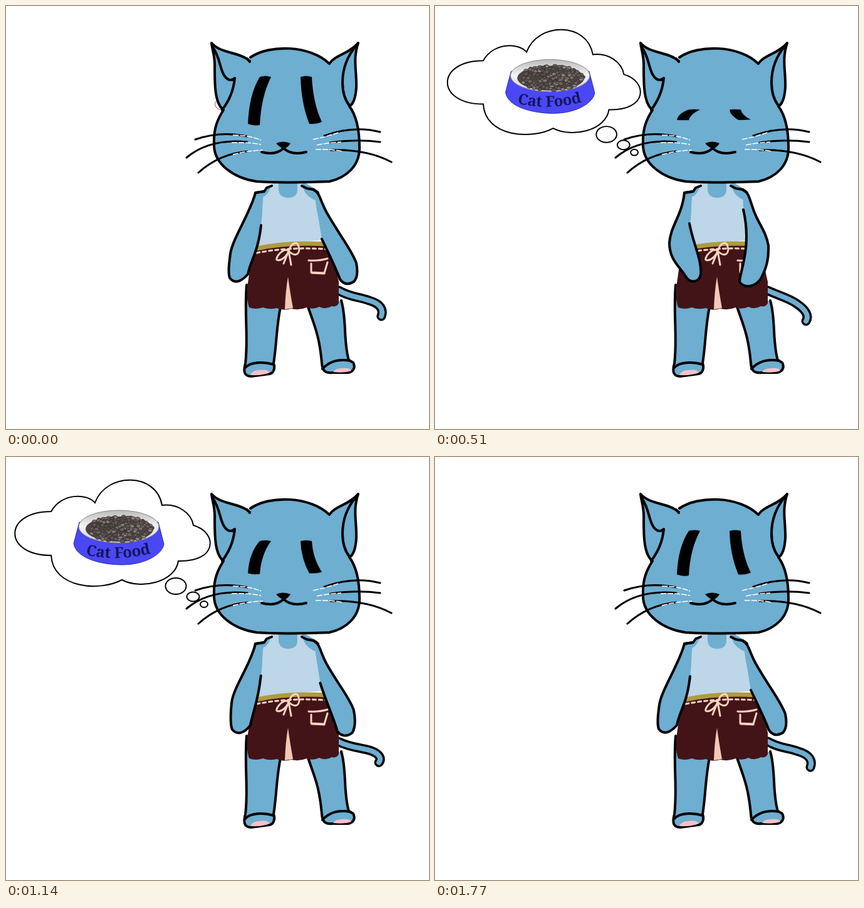
Write an HTML page that moves like this. It is 675 px wide and 675 px high and loops after 1800 ms.

```html
<!DOCTYPE html>
<html lang="en">
<head>
<meta charset="utf-8">
<title>Hungry cat</title>
<style>
  html, body { margin: 0; width: 100%; height: 100%; overflow: hidden; background: #fff; }
  svg { display: block; width: 100vw; height: 100vh; }

  .fur { fill: #6eaed1; }
  .line { stroke: #000; stroke-width: 4; stroke-linecap: round; stroke-linejoin: round; }
  .none { fill: none; }
  .thread { fill: none; stroke: #f8d3c0; stroke-width: 3; stroke-linecap: round; stroke-linejoin: round; }
  .thought { fill: #fff; stroke: #000; stroke-width: 2; }
  .label { font: bold 24px "Noto Serif", "Liberation Serif", serif; fill: #15155c; }

  .cloud, .eyes, .arm, .tail { animation: 1800ms linear infinite; }
  .cloud { animation-name: think; }
  .eyes { animation-name: blink; transform-origin: 0 180px; }
  .arm.left { animation-name: left-arm; }
  .arm.right { animation-name: right-arm; }
  .tail { animation-name: wag; fill: none; stroke-linecap: round; }

  @keyframes think {
    0% { transform: translate(330px, 120px) scale(.3); }
    13.33% { transform: translate(162px, 51px) scale(.725); }
    28.33% { transform: translate(6px, 1.4px) scale(.988); }
    30%, 68% { transform: translate(0, 0) scale(1); }
    71.67% { transform: translate(42px, 25px) scale(.86); }
    85% { transform: translate(245px, 116px) scale(.369); }
    90% { transform: translate(315px, 139px) scale(.18); }
    92%, 100% { transform: translate(350px, 155px) scale(.06); }
  }
  @keyframes blink {
    0% { transform: scaleY(1); }
    13.33% { transform: scaleY(.564); }
    28.33%, 29.5% { transform: scaleY(.22); }
    51.67% { transform: scaleY(.55); }
    71.67% { transform: scaleY(.78); }
    85%, 100% { transform: scaleY(.925); }
  }
  @keyframes left-arm {
    0%, 67.5%, 100% { d: path("M411 296 L398 298 C390 330 362 370 358 395 C356 410 354 425 357 434 C365 444 375 440 386 428 C390 405 402 395 407 350"); }
    13.33% { d: path("M411 296 L398 298 C392 335 368 355 367 382 C367 405 368 425 374 437 C384 447 396 443 402 430 C410 405 404 370 406 345"); }
    28.33%, 30% { d: path("M411 296 L398 298 C394 335 376 350 374 378 C374 405 390 415 401 433 C408 443 422 441 424 428 C426 405 412 380 406 347"); }
    51.67% { d: path("M411 296 L398 298 C392 335 366 357 366 383 C365 405 366 425 372 437 C382 446 394 443 400 430 C408 405 404 372 406 346"); }
  }
  @keyframes right-arm {
    0%, 67.5%, 100% { d: path("M491 293 C502 300 500 308 512 330 C535 370 552 390 559 410 C562 425 560 435 555 440 C545 446 538 443 533 436 C525 415 515 395 504 372"); }
    13.33% { d: path("M491 293 C502 298 500 310 510 330 C520 350 535 365 541 385 C547 410 546 425 544 440 C535 452 520 450 514 443 C511 410 498 380 494 325"); }
    28.33%, 30% { d: path("M491 293 C502 298 502 310 510 330 C518 350 528 360 532 382 C533 405 528 420 520 435 C510 450 492 450 486 440 C486 425 506 385 492 325"); }
    51.67% { d: path("M491 293 C502 298 500 310 510 330 C521 351 537 366 543 386 C548 410 548 425 546 440 C537 452 523 450 517 443 C513 410 499 380 494 328"); }
  }
  @keyframes wag {
    0%, 98.33%, 100% { d: path("M531 454 C550 465 560 463 580 470 C598 475 603 485 599 495"); }
    13.33% { d: path("M531 456 C552 468 572 490 573 505 C574 518 566 520 562 518"); }
    28.33% { d: path("M531 454 C548 462 565 466 577 475 C592 485 597 495 592 503"); }
    48%, 52% { d: path("M531 455 C550 462 575 452 590 447 C605 442 612 447 613 455"); }
    71.67% { d: path("M531 454 C548 465 565 473 578 485 C592 498 590 508 582 511"); }
    85% { d: path("M531 456 C550 468 573 488 575 503 C577 517 570 518 565 518"); }
  }
</style>
</head>
<body>
<svg viewBox="0 0 675 675">
  <defs>
    <linearGradient id="rim" x2="0" y2="1">
      <stop offset="0" stop-color="#bbb"/>
      <stop offset=".5" stop-color="#f4f4f4"/>
      <stop offset="1" stop-color="#ccc"/>
    </linearGradient>
    <path id="baseline" d="M127 156 Q182 168 238 152"/>
  </defs>

  <g class="cloud">
    <path class="thought" d="M72 157 C-5 157 -5 87 72 87 C88 58 128 57 142 73 C160 24 240 24 249 77 C275 74 296 90 299 109 C338 120 338 168 275 166 C270 200 215 212 185 196 C150 215 75 210 72 157 Z"/>
    <ellipse class="thought" cx="271" cy="206" rx="16.5" ry="13"/>
    <ellipse class="thought" cx="298.500" cy="223" rx="10" ry="7.500"/>
    <ellipse class="thought" cx="316" cy="235" rx="6" ry="5"/>
    <path fill="#4a48f5" stroke="#2b2ba8" d="M117 104 L108 138 C112 163 155 172 185 172 C224 172 250 154 252 139 L243 104 Z"/>
    <ellipse cx="180" cy="111" rx="64" ry="26" fill="url(#rim)" stroke="#888"/>
    <ellipse cx="181" cy="115" rx="54" ry="20" fill="#4b4442"/>
    <g id="kibble"></g>
    <text class="label"><textPath href="#baseline">Cat Food</textPath></text>
  </g>

  <path class="tail" stroke="#000" stroke-width="15"/>
  <path class="tail" stroke="#6eaed1" stroke-width="8"/>

  <g class="fur line">
    <path d="M384 445 C380 490 387 530 382 570 C378 584 381 591 391 591 L421 587 C429 585 429 575 427 570 C432 540 431 515 438 480"/>
    <path d="M482 480 C492 510 500 525 504 570 C505 583 510 586 521 585 L546 585 C557 583 557 574 554 569 L547 565 C538 535 544 500 535 470"/>
    <path class="none" d="M382 577 C390 568 410 567 427 572 M505 579 C515 568 530 563 549 566"/>
  </g>
  <path fill="#f5c1c8" d="M390 589 Q393 581 405 581 Q418 579 421 585 Q410 590 390 589 Z M522 584 Q525 578 537 578 Q549 577 551 582 Q540 586 522 584 Z"/>

  <path class="fur" d="M427 279 H472 L497 294 L508 350 H404 L400 298 L420 290 Z"/>
  <path fill="#431417" d="M399 386 Q455 375 514 382 Q525 410 531 440 V474 Q528 481 520 479 Q510 485 500 480 Q490 485 480 481 Q468 486 455 483 Q443 487 432 482 Q420 485 410 481 Q398 485 388 481 Q382 465 387 435 Q390 408 399 386 Z"/>
  <path fill="#f3c9b5" d="M450 432 Q453 455 458 482 L445 484 Q446 455 450 432 Z"/>
  <path fill="#bdd6e8" d="M424 281 H435 V294 Q437 306 450 306 Q464 306 465 294 V281 H472 L474 290 Q478 304 494 310 Q496 340 512 373 Q455 376 399 387 Q411 345 409 305 Q420 302 424 281 Z"/>
  <path fill="none" stroke="#b09a3f" stroke-width="7" d="M400 387 Q450 376 514 380"/>
  <path class="thread" stroke-dasharray="5 5" d="M400 394 Q450 384 512 388"/>
  <path class="thread" d="M451 391 C444 384 430 400 432 405 C438 408 448 400 451 391 C456 376 466 375 467 384 C470 393 464 403 451 391 M451 391 L443 411 M451 391 L455 413"/>
  <path class="thread" d="M483 406 Q500 407 513 403 M487 411 L487 425 L508 426 L513 409"/>
  <path class="thread" stroke-width="4" d="M488 426 L508 427"/>

  <path class="arm left fur line"/>
  <path class="arm right fur line"/>
  <path class="none line" stroke-width="3" d="M398 298 L412 296 L416 290 L424 287 M472 287 L480 291 L491 293 L498 298"/>

  <path class="fur line" d="M390 82 C420 61 485 62 516 92 C525 78 548 76 562 59 C553 85 560 105 559 130 C558 145 555 156 548 160 C559 175 564 195 564 225 C565 255 543 274 516 280 C480 281 435 283 400 280 C365 275 331 253 332 220 C331 195 338 180 347 166 C333 155 333 125 333 100 C334 80 329 70 328 59 C342 76 373 73 389 88"/>
  <path class="none line" d="M330 66 C342 82 341 102 349 112 C355 120 361 119 365 115 C363 137 355 152 345 166 M560 62 C546 78 537 98 537 122 C537 138 541 150 548 159 M385 84 L389 89"/>

  <g class="eyes">
    <path d="M405 113 Q414 110 423 113 Q407 145 405 190 Q395 192 386 188 Q388 140 405 113 Z"/>
    <path d="M470 113 Q479 110 488 113 Q490 155 504 185 Q495 189 484 188 Q471 155 470 113 Z"/>
  </g>

  <path d="M431 219 Q442 214 454 219 Q450 226 443 228 Q436 225 431 219 Z"/>
  <path class="none line" stroke-width="5" d="M408 233 Q430 239 443 227 Q456 239 479 233"/>

  <g class="none line" style="stroke-width:3">
    <path d="M302 213 Q342 199 385 208 M288 242 Q325 211 385 217 M307 266 Q340 236 385 232"/>
    <path d="M508 207 Q555 190 597 201 M518 218 Q560 212 597 217 M518 230 Q575 228 615 249"/>
  </g>
  <g fill="none" stroke="#fff" stroke-width="1.5" stroke-dasharray="9 2">
    <path d="M362 206 Q388 206 407 214 M360 218 Q385 217 407 221 M362 237 Q385 231 410 230"/>
    <path d="M490 213 Q510 209 530 202 M496 222 Q515 218 535 217 M494 229 Q515 228 538 232"/>
  </g>
</svg>
<script>
  // Seeded heap of kibble, drawn back to front
  let seed = 7;
  const rand = () => (seed = seed * 16807 % 2147483647) / 2147483647;
  const tones = ['#6b625f', '#7d7370', '#574e4b', '#8b827e', '#625752'];
  const bits = Array.from({ length: 170 }, () => {
    const a = rand() * Math.PI * 2, r = Math.sqrt(rand());
    return { x: 181 + 52 * r * Math.cos(a), y: 115 + 20 * r * Math.sin(a) };
  }).sort((a, b) => a.y - b.y);
  document.getElementById('kibble').innerHTML = bits.map(({ x, y }, i) =>
    `<ellipse cx="${x}" cy="${y}" rx="${3 + rand()}" ry="${2.2 + rand()}" fill="${tones[i % 5]}" stroke="#302a29" stroke-width=".8"/>`
  ).join('');
</script>
</body>
</html>
```
